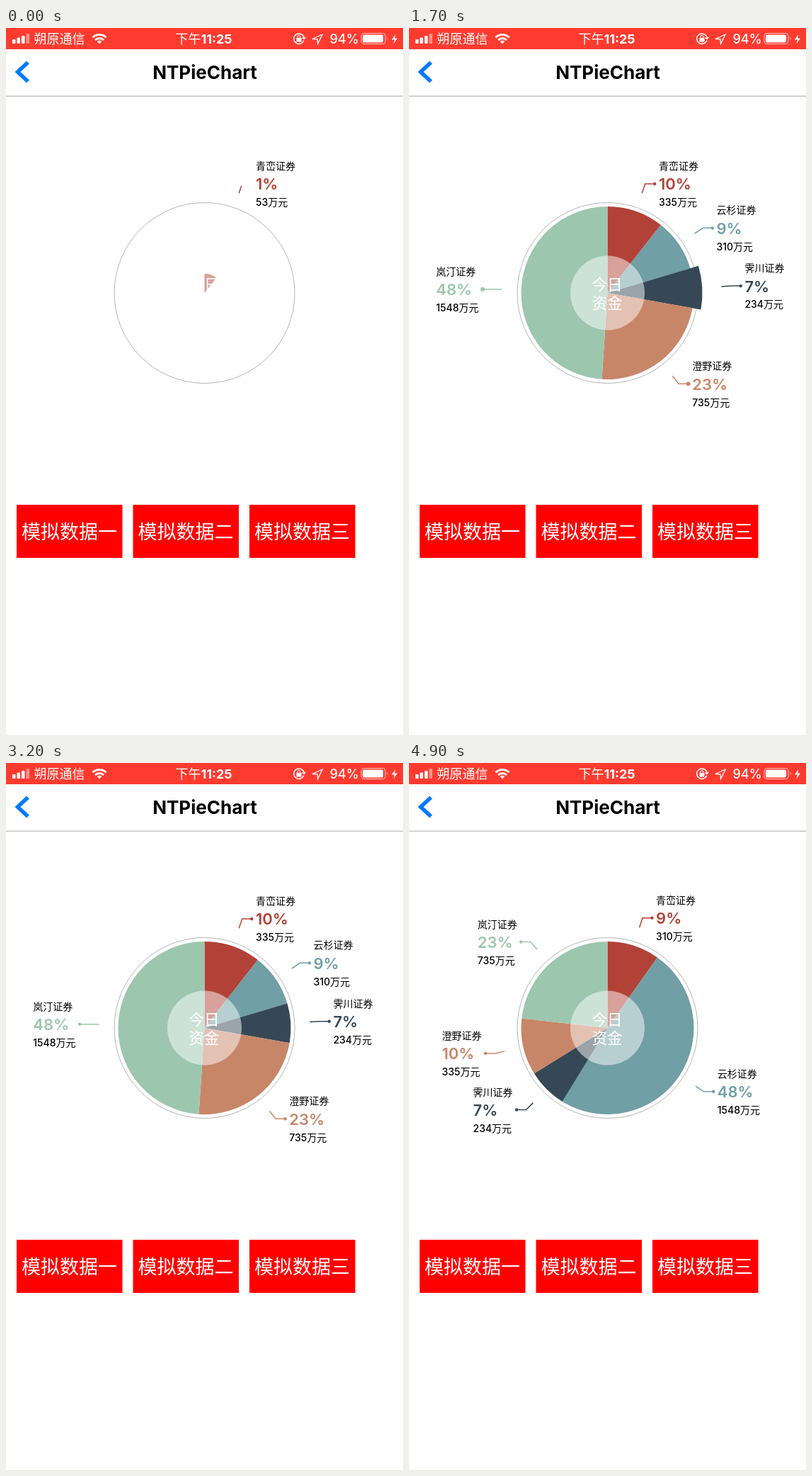
Animation, 561 px wide and 998 px high, one loop 5000 ms. Source, as an HTML page:

```html
<!DOCTYPE html>
<html lang="zh">
<head>
<meta charset="utf-8">
<style>
  html, body { margin: 0; width: 100%; height: 100%; overflow: hidden; background: #fff; }
  svg { display: block; width: 561px; height: 998px; font-family: Inter, "Noto Sans CJK SC", "Noto Sans CJK", sans-serif; }
  .status { fill: #fff; font-size: 18px; font-weight: 500; }
  .small { font-size: 14px; font-weight: 500; }
  .percent { font-size: 22px; font-weight: 600; }
  .button { fill: #fff; font-size: 27px; text-anchor: middle; }
  .center { fill: #fff; font-size: 21.5px; font-weight: 500; text-anchor: middle; }
  .line { fill: none; stroke: #fff; stroke-width: 1.5; }
</style>
</head>
<body>
<svg id="stage" viewBox="0 0 561 998">
  <rect width="561" height="30" fill="#ff3b30"/>
  <g fill="#fff">
    <rect x="9" y="16" width="4.5" height="6" rx="1"/>
    <rect x="15.5" y="13.5" width="4.5" height="8.5" rx="1"/>
    <rect x="22" y="11" width="4.5" height="11" rx="1"/>
    <rect x="28.5" y="8" width="4.5" height="14" rx="1" opacity=".45"/>
    <path d="M132 22.5l-3.2-3.4a4.6 4.6 0 0 1 6.4 0z"/>
    <path d="M433 15.5L447 9L440.500 22.500L440 15.800Z" fill="none" stroke="#fff" stroke-width="1.3"/>
    <rect x="504" y="9.500" width="29" height="11" rx="2"/>
    <path d="M538.500 12.500q2.500 2.500 0 5z" opacity=".6"/>
    <path d="M550.500 8.500l-5.500 8h4l-1.500 6l5.500-8h-4z"/>
    <rect x="410.500" y="14" width="7" height="5.500"/>
  </g>
  <g class="line">
    <path d="M122.500 13.200a13.500 13.500 0 0 1 19 0M126 17a8.500 8.500 0 0 1 12 0" stroke-width="2.800"/>
    <path d="M420.800 17.500a7.200 7.200 0 1 1 .3-3.500M418.500 13.500l2.600 2l2-2.500"/>
    <path d="M412 14v-1.500a2 2 0 0 1 4 0v1.500" stroke-width="1.200"/>
    <rect x="502" y="7.500" width="34" height="15" rx="3.500" stroke-width="1" opacity=".7"/>
  </g>
  <g class="status">
    <text x="39.500" y="22">朔原通信</text>
    <text x="239.500" y="22">下午<tspan font-weight="700">11:25</tspan></text>
    <text x="457.500" y="22">94%</text>
  </g>
  <path d="M31 48.500L16.500 62L31 75.500" fill="none" stroke="#007aff" stroke-width="5.500"/>
  <text x="281" y="72" font-size="26" font-weight="700" text-anchor="middle">NTPieChart</text>
  <path d="M0 96.300H561" stroke="#c4c4c6" stroke-width="1.400"/>
  <g id="buttons"></g>
  <circle cx="280.500" cy="374" r="127.500" fill="none" stroke="#b4b4b4"/>
  <g id="pie"></g>
  <circle cx="280.500" cy="374" r="52.500" fill="#fff" opacity=".5"/>
  <g class="center"><text x="280" y="370">今日</text><text x="280" y="395.500">资金</text></g>
  <g id="labels"></g>
</svg>
<script>
const CX = 280.5, CY = 374, RADIUS = 122, POP = 12, TOTAL = 3162;
const names = ['青峦证券', '云杉证券', '霁川证券', '澄野证券', '岚汀证券'];
const colors = ['#b24237', '#709fa5', '#364855', '#c88669', '#9cc6ae'];
const dataSets = [
  [335, 310, 234, 735, 1548],
  [327, 310, 1304, 661, 560],
  [735, 310, 234, 335, 1548],
  [310, 1548, 234, 335, 735]
];
const switches = [3350, 3850, 4320];
const taps = [1020, 1220, 1430, 1900, 2450, 2900];

const $ = id => document.getElementById(id);
const ramp = (t, start, length) => Math.min(1, Math.max(0, (t - start) / length));
const ease = x => x * x * (3 - 2 * x);
const polar = (r, a) => [CX + r * Math.sin(a), CY - r * Math.cos(a)];

function set(el, attrs) {
  for (const key in attrs) el.setAttribute(key, attrs[key]);
  return el;
}
function add(parent, tag, attrs, text = '') {
  const el = document.createElementNS('http://www.w3.org/2000/svg', tag);
  el.textContent = text;
  return parent.appendChild(set(el, attrs));
}

['一', '二', '三'].forEach((n, i) => {
  const x = 15 + i * 164.5;
  add($('buttons'), 'rect', { x, y: 673, width: 149.5, height: 75, fill: '#f00' });
  add($('buttons'), 'text', { x: x + 74.5, y: 721, class: 'button' }, '模拟数据' + n);
});

const slices = names.map((name, i) => {
  const fill = colors[i], group = add($('labels'), 'g', {});
  return {
    group,
    wedge: add($('pie'), 'path', { fill }),
    leader: add(group, 'polyline', { fill: 'none', stroke: fill, 'stroke-width': 1.5 }),
    dot: add(group, 'circle', { fill }),
    name: add(group, 'text', { class: 'small' }, name),
    percent: add(group, 'text', { class: 'percent', fill }),
    amount: add(group, 'text', { class: 'small' })
  };
});

function valuesAt(t) {
  return dataSets[0].map((v, i) => switches.reduce((sum, start, k) =>
    sum + (dataSets[k + 1][i] - dataSets[k][i]) * ease(ramp(t, start, 390)), v));
}

function draw(t) {
  let from = 0;
  valuesAt(t).forEach((value, i) => {
    const s = slices[i];
    const to = from + value / TOTAL * 2 * Math.PI, mid = (from + to) / 2;
    const grow = ramp(t + 49, i * 140, 220);
    const pop = POP * (ramp(t, taps[i], 270) - ramp(t, taps[i + 1], 270));
    const r = RADIUS * grow + pop;
    const large = to - from > Math.PI ? 1 : 0;
    set(s.wedge, { d: `M${CX} ${CY}L${polar(r, from)}A${r} ${r} 0 ${large} 1 ${polar(r, to)}Z` });
    s.wedge.style.display = s.group.style.display = grow > 0 ? '' : 'none';

    const right = Math.sin(mid) >= 0, trim = Math.min(1, grow * 1.75);
    const [bendX, y] = polar(163 + pop, mid);
    const dotX = bendX + (right ? 13.5 : -13.5);
    set(s.leader, {
      points: `${polar(149 + pop, mid)} ${bendX},${y} ${dotX},${y}`,
      'stroke-dasharray': `${trim * 28} 99`
    });
    set(s.dot, { cx: dotX, cy: y, r: trim < 1 ? 0 : t < taps[i] ? 3 : 2.2 });

    const shown = value * grow ** 1.22;
    s.percent.textContent = Math.floor(shown / TOTAL * 100) + '%';
    s.amount.textContent = Math.floor(shown + 1e-6) + '万元';
    const width = Math.max(s.name.getComputedTextLength(), s.amount.getComputedTextLength());
    const x = right ? dotX + 5.7 : dotX - 5.5 - width;
    set(s.name, { x, y: y - 20 });
    set(s.percent, { x, y: y + 8.5 });
    set(s.amount, { x, y: y + 31.3 });
    from = to;
  });
}

// The picture advances ten times a second.
function tick() {
  draw(Math.floor(performance.now() % 5000 / 100) * 100);
  requestAnimationFrame(tick);
}
tick();
</script>
</body>
</html>
```
